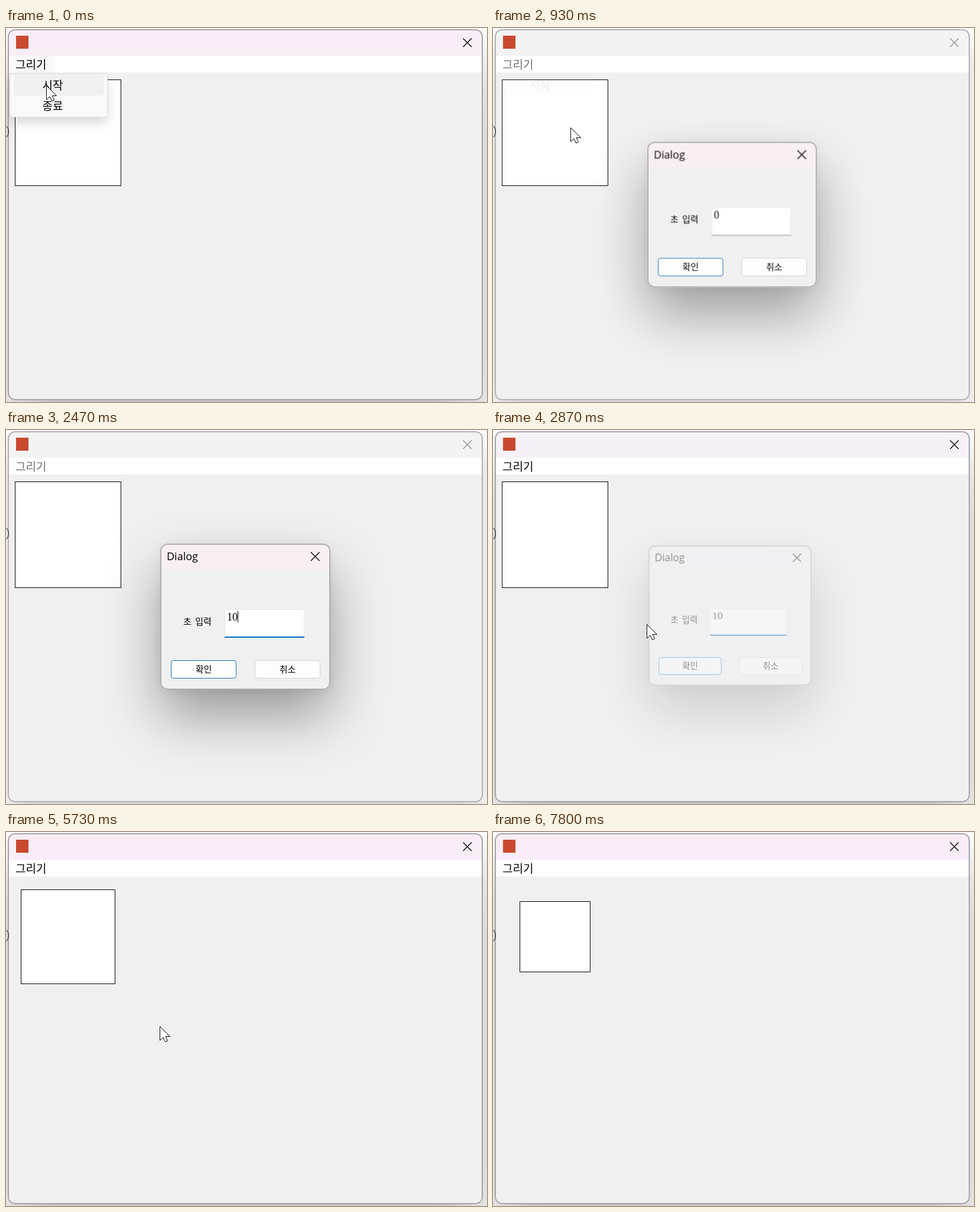
An HTML page for the animation above (8000 ms loop, 814 px wide and 632 px high).

```html
<!DOCTYPE html>
<html lang="ko">
<head>
<meta charset="utf-8">
<title>그리기</title>
<style>
html, body { margin: 0; width: 100%; height: 100%; overflow: hidden; background: #fff; }
#stage { position: relative; width: 814px; height: 632px; overflow: hidden; background: #fff; }
#stage * { animation: 8s step-end infinite; }
#stage > * { position: absolute; box-sizing: border-box; }
svg { display: block; }
text { font: 19px "Noto Sans CJK KR", "Noto Sans CJK", sans-serif; white-space: pre; }
.small { font-size: 15px; word-spacing: 2.3px; }
.latin { font: 18px "Open Sans", "Noto Sans", sans-serif; }
.serif { font: 18px "Liberation Serif", serif; }
.cross { fill: none; stroke: #111; stroke-width: 1.6; }

/* main window */
#win { left: 3px; top: 2px; width: 804px; height: 627px; border-radius: 12px; overflow: hidden; }
#stage #win { animation-name: glow; }
#stage #title { animation-name: title; }
#stage #frame { animation-name: frame; }
#stage #name { animation-name: name; }
#stage #close { animation-name: close; }
#stage #hot { animation-name: popup; }
#square { left: 105px; top: 177px; width: 180px; height: 180px; transform: translate(-50%, -50%);
  border: 1px solid #000; background: #fff; }
#stage #square { animation-name: square; }

/* popup menu */
#menu { left: 6px; top: 77px; width: 166px; height: 74px; border: 1px solid #dcdcdc; border-radius: 6px;
  background: #f9f9f9; box-shadow: 0 10px 18px rgba(0,0,0,.15); }
#stage #menu { animation-name: popup; }
#items { left: 0; top: 0; }
#stage #pick { animation-name: pick; }
#stage #quit { animation-name: popup; }

/* dialog */
#dlg { left: 261px; top: 192px; width: 288px; height: 247px; border-radius: 12px; overflow: hidden;
  transform-origin: 48px 72px; opacity: 0;
  box-shadow: 0 45px 92px rgba(0,0,0,.36), 0 3px 18px rgba(0,0,0,.07); }
#stage #dlg { animation-name: dlg; }
#stage #dtitle { animation-name: dtitle; }
#stage #line { animation-name: line; }
#stage #sel { animation-name: sel; }
#stage #zero { animation-name: zero; }
#stage #caret { animation-name: caret; }
#stage #one { animation-name: one; }
#stage #ten { animation-name: ten; }
#zero, #one, #ten, #sel, #caret { opacity: 0; }

/* pointer */
#top { left: 0; top: 0; }
#stage #pointer { animation-name: move; }
#stage #arrow { animation-name: arrow; }
#stage #beam { animation-name: beam; }

@keyframes glow {
  0%, 37.5% { box-shadow: 0 48px 96px rgba(0,0,0,.28); }
  9.25% { box-shadow: 0 24px 48px rgba(0,0,0,.19); }
  35% { box-shadow: 0 48px 96px rgba(0,0,0,.28); }
}
@keyframes frame { 0%, 35% { stroke: #a5a5a5; } 9.25% { stroke: #b2b2b2; } }
@keyframes title {
  0% { fill: #f9eef8; }
  8.375% { fill: #f9eef8; animation-timing-function: steps(4); }
  11.625% { fill: #f3f3f3; }
  34.125% { fill: #f3f3f3; animation-timing-function: steps(4); }
  37.5%, 100% { fill: #f9eef8; }
}
@keyframes name { 0%, 34.125% { fill: #000; } 9.25% { fill: #6d6d6d; } }
@keyframes close { 0%, 34.125% { stroke: #111; } 9.25% { stroke: #979797; } }
@keyframes popup { 0% { visibility: visible; } 8.375%, 100% { visibility: hidden; } }
@keyframes pick {
  0% { opacity: 1; }
  8.375% { opacity: .85; animation-timing-function: steps(4); }
  11.625% { opacity: .07; }
  12.5%, 100% { opacity: 0; }
}
@keyframes square {
  0% { width: 180px; height: 180px; }
  46.625% { width: 200px; height: 200px; }
  59.125% { width: 180px; height: 180px; }
  71.625% { width: 160px; height: 160px; }
  85% { width: 140px; height: 140px; }
  97.5%, 100% { width: 120px; height: 120px; }
}
@keyframes dlg {
  0% { opacity: 0; transform: scale(.93); }
  10% { opacity: .35; transform: scale(.95); }
  10.875% { opacity: .8; transform: scale(.985); }
  11.625% { opacity: .97; transform: scale(.9965); }
  12.5% { opacity: 1; transform: none; }
  34.125% { opacity: .95; transform: scale(.995); }
  35% { opacity: .7; transform: scale(.978); }
  35.875% { opacity: .4; transform: scale(.959); }
  36.625% { opacity: .12; transform: scale(.94); }
  37.5%, 100% { opacity: 0; transform: scale(.93); }
}
@keyframes dtitle { 0% { fill: #f9eff3; } 34.125%, 100% { fill: #f0f0f5; } }
@keyframes line { 0% { visibility: hidden; } 19.125%, 100% { visibility: visible; } }
@keyframes sel { 0%, 28.375%, 100% { opacity: 0; } 19.125% { opacity: 1; } }
@keyframes zero { 0% { opacity: 1; fill: #000; } 19.125% { opacity: 1; fill: #fff; } 28.375%, 100% { opacity: 0; } }
@keyframes one { 0%, 30.875%, 100% { opacity: 0; } 28.375% { opacity: 1; } }
@keyframes ten { 0% { opacity: 0; } 30.875%, 100% { opacity: 1; } }
@keyframes caret {
  0% { opacity: 0; }
  19.125% { opacity: 1; transform: none; }
  25.875% { opacity: 0; }
  28.375% { opacity: 1; transform: translateX(9px); }
  30.875% { opacity: 1; transform: translateX(18px); }
  34.125%, 100% { opacity: 0; }
}
@keyframes move {
  0% { transform: translate(68px, 97px); }
  9.25% { transform: translate(68px, 97px); animation-timing-function: steps(3); }
  11.625% { transform: translate(131px, 168px); animation-timing-function: steps(7); }
  17.5% { transform: translate(389px, 318px); }
  18.375% { transform: translate(397px, 322px); }
  19.125% { transform: translate(257px, 328px); }
  20% { transform: translate(260px, 328px); }
  77.5%, 100% { transform: translate(216px, 416px); }
}
@keyframes arrow {
  0%, 20%, 35% { visibility: visible; }
  17.5%, 28.375%, 78.375%, 100% { visibility: hidden; }
}
@keyframes beam { 0%, 20%, 100% { visibility: hidden; } 17.5% { visibility: visible; } }
</style>
</head>
<body>
<div id="stage">
  <div id="win">
    <svg width="804" height="627" viewBox="3 2 804 627">
      <rect x="3" y="2" width="804" height="627" fill="#f0f0f0"/>
      <rect id="title" x="3" y="2" width="804" height="45" fill="#f9eef8"/>
      <rect x="3" y="47" width="804" height="28" fill="#fff"/>
      <rect id="hot" x="5" y="47" width="76" height="28" fill="#f9f9f9"/>
      <rect x="17" y="13" width="21" height="22" fill="#c9492f"/>
      <path id="close" class="cross" d="M773.5 17.5l14.5 14.5m0-14.5l-14.5 14.5"/>
      <text id="name" x="16" y="69">그리기</text>
      <rect id="frame" x="4" y="3" width="802" height="625" rx="11" fill="none" stroke="#a5a5a5" stroke-width="2"/>
    </svg>
  </div>

  <div id="square"></div>

  <div id="menu"></div>
  <svg id="items" width="200" height="160">
    <g id="pick">
      <rect x="13" y="79" width="152" height="35" rx="3" fill="#f0f0f0"/>
      <text x="61.500" y="104">시작</text>
    </g>
    <text id="quit" x="61.500" y="139">종료</text>
  </svg>

  <div id="dlg">
    <svg width="288" height="247" viewBox="261 192 288 247">
      <rect x="261" y="192" width="288" height="247" fill="#f0f0f0"/>
      <rect id="dtitle" x="261" y="192" width="288" height="44" fill="#f9eff3"/>
      <text class="latin" x="272" y="220">Dialog</text>
      <path class="cross" d="M516 206.500l14.500 14.500m0-14.500l-14.500 14.500"/>
      <text class="small" x="300" y="328.500">초 입력</text>
      <rect x="370.500" y="303.500" width="134" height="47" rx="1" fill="#fff" stroke="#e8e8e8"/>
      <path d="M370 350.500h135" stroke="#868686"/>
      <path id="line" d="M370 350h135" stroke="#0067b8" stroke-width="2"/>
      <rect id="sel" x="374" y="306" width="9" height="19" fill="#0078d7"/>
      <text id="zero" class="serif" x="374" y="322">0</text>
      <text id="one" class="serif" x="374" y="322">1</text>
      <text id="ten" class="serif" x="374" y="322">10</text>
      <path id="caret" d="M374.500 306v19" stroke="#000"/>
      <rect x="279.500" y="389.500" width="110" height="30" rx="4" fill="#fdfdfd" stroke="#0f6cb6"/>
      <rect x="421.500" y="389.500" width="110" height="30" rx="4" fill="#fdfdfd" stroke="#d0d0d0"/>
      <text class="small" x="334.500" y="409.500" text-anchor="middle">확인</text>
      <text class="small" x="476.500" y="409.500" text-anchor="middle">취소</text>
      <rect x="262" y="193" width="286" height="245" rx="11" fill="none" stroke="#adadad" stroke-width="2"/>
    </svg>
  </div>

  <svg id="top" width="814" height="632">
    <path d="M1 165.500q7 9.500 0 19" fill="none" stroke="#111"/>
    <g id="pointer">
      <path id="arrow" d="M.5 .5V24L6 19l3.500 7.500 4-1.700-3.400-7.300h7.400z" fill="#fff" stroke="#000"/>
      <path id="beam" d="M0 .5h3l.5 1 .5-1h3M3.500 1v24M0 25.500h3l.5-1 .5 1h3" fill="none" stroke="#000"/>
    </g>
  </svg>
</div>
</body>
</html>
```
